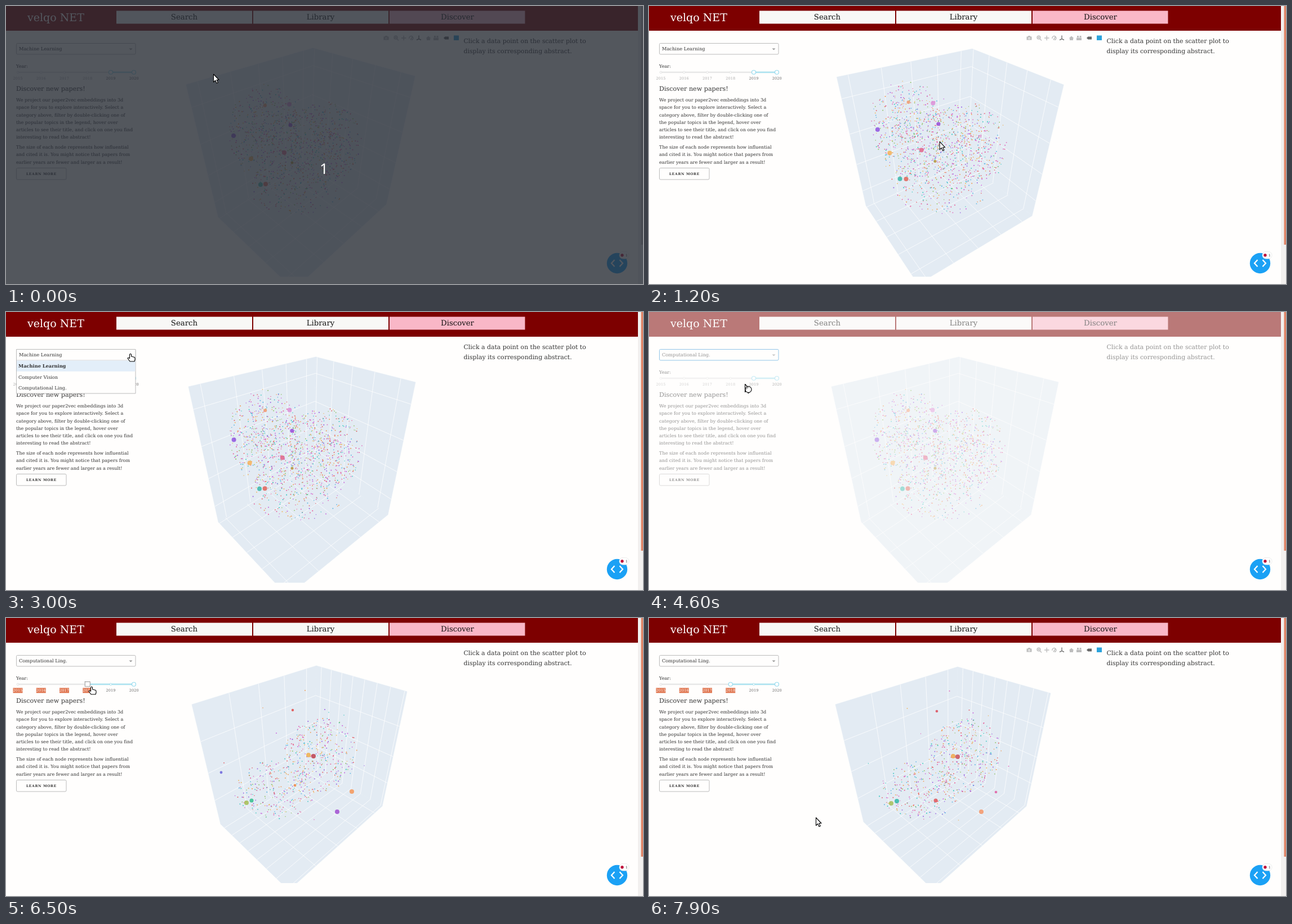
Animation of 1131x495 px, one loop 8000 ms. Source, as an HTML page with a canvas:

```html
<!DOCTYPE html>
<html lang="en">
<head>
<meta charset="utf-8">
<title>Paper explorer</title>
<style>
html, body { margin: 0; width: 100%; height: 100%; overflow: hidden; background: #fffefd; }
#app, #app > *, #top { position: absolute; left: 0; top: 0; width: 1131px; height: 495px; }
svg { display: block; }
text { font-family: "DejaVu Serif", serif; text-rendering: geometricPrecision; white-space: pre; fill: #333; }
.nav { font-size: 13.3px; text-anchor: middle; fill: #111; }
.lead { font-size: 10.9px; }
.body { font-size: 8.12px; }
.field { font-size: 8.25px; }
.year { font-size: 6.6px; text-anchor: middle; fill: #aaa; }
.year.on { fill: #666; }
.year.picked { fill: #fff; }
.tip text { font: 6.95px "Liberation Sans", Arial, sans-serif; fill: #444; }
.box { fill: #fffefd; stroke: #bbb; }
.spike path { fill: none; stroke: #444; stroke-width: .9; }
.arrow, .hand { fill: #fff; stroke: #000; stroke-width: 1.1; stroke-linejoin: round; }
</style>
</head>
<body>
<div id="app">
  <canvas id="plot" width="1131" height="495"></canvas>
  <svg viewBox="0 0 1131 495">
    <rect width="1122" height="44" fill="#7d0000"/>
    <text x="38" y="26.5" font-size="19" style="fill:#fff">velqo NET</text>
    <rect x="196" y="8.5" width="241" height="23" fill="#f8f8f6"/>
    <rect x="439" y="8.5" width="240" height="23" fill="#f8f8f6"/>
    <rect x="681" y="8.5" width="240.500" height="23" fill="#f9b7c7"/>
    <text class="nav" x="316.500" y="24.300">Search</text>
    <text class="nav" x="558.500" y="24.300">Library</text>
    <text class="nav" x="801.500" y="24.300">Discover</text>

    <text class="lead" x="812.500" y="66">Click a data point on the scatter plot to</text>
    <text class="lead" x="812.500" y="84">display its corresponding abstract.</text>

    <rect id="select" class="box" x="18.500" y="66.500" width="211.500" height="19.500" rx="2"/>
    <text id="value" class="field" x="23" y="78.500"></text>
    <path d="M218.500 75.500h6l-3 3z" fill="#999"/>

    <text class="body" x="18" y="110">Year:</text>
    <g id="slider"></g>

    <text font-size="11.150" x="18" y="150.500">Discover new papers!</text>
    <g id="copy"></g>
    <rect class="box" x="18.500" y="288.500" width="88.500" height="20.500" rx="2"/>
    <text x="36" y="301" font-size="6" font-weight="bold" letter-spacing=".65">LEARN MORE</text>

    <g id="menu">
      <path class="box" d="M18.500 66.500h211.500v78.500h-211.500z"/>
      <text class="field" x="23" y="78.500">Machine Learning</text>
      <rect id="hover" x="19" width="210.500" height="19.500" fill="#e3eef9"/>
      <path d="M19 85.800h211" stroke="#ddd"/>
      <text class="field" x="22" y="99.300" font-weight="bold">Machine Learning</text>
      <text class="field" x="22" y="119">Computer Vision</text>
      <text class="field" x="22" y="138.300">Computational Ling.</text>
    </g>

    <g id="modebar" fill="none" stroke="#bdbdbd" stroke-width="1.400">
      <path d="M670.500 54.500h2l1-1.500h3l1 1.500h2v6h-9z" fill="#bdbdbd" stroke="none"/>
      <circle cx="675" cy="57.500" r="1.400" stroke="#fff" stroke-width="1"/>
      <circle cx="692" cy="56" r="2.900"/><path d="M694 58.500l3 3M690.500 56h3M692 54.500v3"/>
      <path d="M702 57h8.500M706.300 52.800v8.500"/>
      <path d="M716 58a3.500 3.500 0 1 1 4 2.500M718 60.500l4-6"/>
      <path d="M733 52.500v6M729 60.500l4-2 4 2" stroke="#777"/>
      <path d="M745.500 57.500l4.500-4 4.500 4h-1.500v3.500h-6v-3.500z" fill="#bdbdbd" stroke="none"/>
      <path d="M759 56.500h9v4.500h-9zM760 53h3v3h-3zM764.500 53h3v3h-3z" fill="#bdbdbd" stroke="none"/>
      <path d="M777 57l2.500-2.500h6.500v5h-6.500z" fill="#666" stroke="none"/>
      <rect x="795" y="52.500" width="9" height="8.500" fill="#2ba3dc" stroke="none"/>
    </g>

    <g id="tip" class="tip">
      <g class="spike">
        <path d="M481 93L492 300L627 396M596 89L581 298L416 411M353 272L543 184L697 252"/>
        <path d="M487 208L533 240L588 205M533 240V332"/>
      </g>
      <rect x="643" y="212" width="50.500" height="43" fill="#fffefd" fill-opacity=".85"/>
      <rect x="371" y="212.500" width="271" height="42.500" fill="#f59d5d" stroke="#555"/>
      <text x="373" y="222">x: −4.703126</text>
      <text x="373" y="231.600">y: −2.84621</text>
      <text x="373" y="241">z: 0.1473798</text>
      <text x="373" y="250.300">[1911.99103] Wave Modeling of Underground Heat by Gradient-trained Filter Units</text>
      <text x="645" y="222" style="fill:#f0a35f">Deep learning</text>
    </g>
  </svg>
</div>

<svg id="top" viewBox="0 0 1131 495">
  <rect x="1122" width="9" height="495" fill="#f2f0ef"/>
  <rect id="thumb" x="1127.500" width="3.500" height="425"/>
  <circle cx="1085" cy="458" r="18.200" fill="#1ba1f5"/>
  <path d="M1080.500 452l-5.500 6 5.500 6M1089.500 452l5.500 6-5.500 6" fill="none" stroke="#fff" stroke-width="2.200"/>
  <rect x="1089" y="437.500" width="17" height="12.500" rx="6" fill="#fff" stroke="#e4e4e4" stroke-width=".7"/>
  <circle cx="1094" cy="443.700" r="2.700" fill="#c0143c"/>
  <text x="1100" y="446" font-size="6">1</text>
  <g id="countdown">
    <rect width="1131" height="495" fill="#292d36" fill-opacity=".8"/>
    <text x="564.500" y="299" text-anchor="middle" style="font:26px 'Noto Sans',sans-serif;fill:#fff">1</text>
  </g>
  <g id="cursor">
    <path id="arrow" class="arrow" d="M.5 .5V14.500L3.700 11.500L6 16.500L8.300 15.500L6 10.500H10z"/>
    <g id="busy"><circle cx="6.500" cy="10" r="5.500" fill="#fff" stroke="#222" stroke-width="1.300"/><path id="spin" d="M6.500 6.500a3.500 3.500 0 0 1 3.500 3.500" fill="none" stroke="#888" stroke-width="1.300"/></g>
    <path id="hand" class="hand" d="M-1.500 8.500V1.500Q0 -.5 1.500 1.500V5L7 6.500Q8 7 8 9V11L7 14H-1L-5 8.500Q-4.500 6.500 -1.500 8.500z"/>
  </g>
</svg>

<script>
const $ = id => document.getElementById(id);
const show = (id, on) => { $(id).style.display = on ? '' : 'none'; };
const mix = (a, b, k) => a + (b - a) * k;

// Piecewise linear value over rows of [time, ...values].
function track(rows, t) {
  let i = 0;
  while (i < rows.length - 1 && rows[i + 1][0] <= t) i++;
  const a = rows[i], b = rows[i + 1];
  if (!b) return a.slice(1);
  const k = (t - a[0]) / (b[0] - a[0]);
  return a.slice(1).map((v, n) => mix(v, b[n + 1], k));
}

function random(seed) {
  return () => {
    seed = (seed + 0x6D2B79F5) | 0;
    let n = Math.imul(seed ^ seed >>> 15, 1 | seed);
    n = n + Math.imul(n ^ n >>> 7, 61 | n) ^ n;
    return ((n ^ n >>> 14) >>> 0) / 4294967296;
  };
}

const copy = [
  'We project our paper2vec embeddings into 3d', 'space for you to explore interactively. Select a',
  'category above, filter by double-clicking one of', 'the popular topics in the legend, hover over',
  'articles to see their title, and click on one you find', 'interesting to read the abstract!',
  'The size of each node represents how influential', 'and cited it is. You might notice that papers from',
  'earlier years are fewer and larger as a result!'];
$('copy').innerHTML = copy.map((line, i) =>
  `<text class="body" x="18" y="${170 + i * 13.25 + (i > 5 ? 4.7 : 0)}">${line}</text>`).join('');

const yearX = i => 21 + i * 41.25;
function drawSlider(low, picked, focused) {
  let s = `<path d="M21 118H227" stroke="#e7e7e7" stroke-width="2.500"/>
    <path d="M${low} 118H227" stroke="#abe2f0" stroke-width="2.500"/>`;
  for (let i = 0; i < 6; i++) {
    const x = yearX(i), on = x >= low - 2, pick = picked && i < 4;
    s += `<circle cx="${x}" cy="118" r="1.800" fill="#fff" stroke="${on ? '#abe2f0' : '#e2e2e2'}"/>`;
    if (pick) s += `<rect x="${x - 8.500}" y="124.500" width="17" height="9" fill="#e0754f"/>`;
    s += `<text class="year ${pick ? 'picked' : on ? 'on' : ''}" x="${x}" y="131.300">${2015 + i}</text>`;
  }
  for (const x of [low, 227])
    s += `<circle cx="${x}" cy="118" r="3.500" fill="#fff" stroke="#96dbee" stroke-width="1.200"/>`;
  if (focused) s += `<rect x="${low - 4.500}" y="113.500" width="9" height="8.500" fill="#fff" stroke="#333" stroke-dasharray="1 1"/>`;
  $('slider').innerHTML = s;
}

// Cube corners: back top, left top, right top, left bottom, right bottom, front bottom, back bottom.
const poses = [
  [545,75, 320,140, 726,125, 377,376, 675,353, 511,505, 540,270],
  [590,77, 341,119, 742,149, 390,344, 683,385, 459,490, 578,277],
  [550,80, 324,133, 727,125, 377,374, 678,361, 500,506, 546,268],
  [551,85, 330,154, 712,131, 381,367, 668,335, 502,485, 546,265],
  [548,87, 331,154, 713,134, 381,363, 670,335, 504,484, 545,265]];
const turn = [[0, 0], [800, 0], [1300, .8], [1400, .8], [1700, 1], [2100, 2]];

const steps = (from, gap, n) => Array.from({ length: n }, (_, i) => from + gap * i);
const ticks = [
  { u: steps(.065, .208, 5), v: steps(.02, .218, 5), w: steps(.13, .24, 4) },
  { u: steps(.235, .22, 4), v: steps(.07, .13, 8), w: steps(.25, .25, 3) }];

// Maps the unit square onto a quad in perspective.
function quad([x0, y0], [x1, y1], [x2, y2], [x3, y3]) {
  const ax = x1 - x2, ay = y1 - y2, bx = x3 - x2, by = y3 - y2;
  const sx = x0 - x1 + x2 - x3, sy = y0 - y1 + y2 - y3, den = ax * by - bx * ay;
  const g = (sx * by - bx * sy) / den, h = (ax * sy - sx * ay) / den;
  return (s, t) => {
    const w = g * s + h * t + 1;
    return [((x1 - x0 + g * x1) * s + (x3 - x0 + h * x3) * t + x0) / w,
            ((y1 - y0 + g * y1) * s + (y3 - y0 + h * y3) * t + y0) / w];
  };
}

const ctx = $('plot').getContext('2d');
function drawCube(flat, grid) {
  const [T, L, R, l, r, F, B] = steps(0, 2, 7).map(i => [flat[i], flat[i + 1]]);
  const faces = [[[L, T, B, l], grid.u, grid.w], [[T, R, r, B], grid.v, grid.w], [[l, B, r, F], grid.u, grid.v]];
  ctx.fillStyle = ctx.strokeStyle = '#e3ebf3';
  ctx.lineWidth = .6;
  for (const [corners] of faces) {
    ctx.beginPath();
    corners.forEach(p => ctx.lineTo(...p));
    ctx.closePath(); ctx.fill(); ctx.stroke();
  }
  ctx.strokeStyle = '#fff';
  ctx.lineWidth = .75;
  ctx.beginPath();
  for (const [corners, across, down] of faces) {
    const at = quad(...corners);
    for (const s of across) { ctx.moveTo(...at(s, 0)); ctx.lineTo(...at(s, 1)); }
    for (const t of down) { ctx.moveTo(...at(0, t)); ctx.lineTo(...at(1, t)); }
  }
  ctx.stroke();
}

const palette = ['#f2913f', '#e8498a', '#27c4bc', '#c54fd8', '#e4555c', '#8cbf5a', '#8f4fe0', '#4aaee0', '#f0b252', '#e05cb8'];
const color = rnd => palette[Math.floor(rnd() * palette.length)];
const dotSize = rnd => .7 + rnd() * .35;

// Random points in weighted ellipses given as [share, cx, cy, rx, ry].
function scatter(rnd, count, ellipses) {
  return Array.from({ length: count }, () => {
    let pick = rnd();
    const [, cx, cy, rx, ry] = ellipses.find(e => (pick -= e[0]) < 0) || ellipses[0];
    const a = rnd() * 2 * Math.PI, d = rnd() ** .6;
    return [cx + rx * d * Math.cos(a), cy + ry * d * Math.sin(a)];
  });
}

function firstCloud() {
  const rnd = random(11);
  const spots = scatter(rnd, 1250, [[.36, 458, 222, 62, 84], [.36, 565, 242, 66, 72], [.16, 515, 325, 85, 46], [.12, 505, 250, 100, 95]]);
  const dots = spots.map(([x, y]) =>
    ({ x, y, dx: (rnd() - .5) * 26, dy: (x - 535) * .12, r: dotSize(rnd), c: color(rnd) }));
  const big = [[503,175,2,-3,4,'#dc92d8'], [505,212,14,-3,3.5,'#9a4fd8'], [404,231,3,-17,4,'#9258e0'],
    [435,272,-12,-16,4,'#f5b45c'], [494,261,-16,-7,4,'#e0688c'], [452,318,-10,-16,4,'#3cb8ac'],
    [461,317,-7,-14,4,'#e0665c'], [460,177,1,-9,3,'#f09a70'], [508,279,0,-4,2.5,'#b8963c']];
  return dots.concat(big.map(([x, y, dx, dy, r, c]) => ({ x, y, dx, dy, r, c })));
}

function secondCloud(seed, ox, oy, big) {
  const tint = random(seed);
  const dots = scatter(random(5), 580, [[.52, 560, 243, 66, 66], [.48, 477, 306, 72, 53]]);
  dots.push([531,129], [456,160], [566,163], [573,168], [600,173], [387,258], [636,263], [480,205], [547,359]);
  return dots.map(([x, y]) => ({ x: x + ox, y: y + oy, r: dotSize(tint), c: color(tint) }))
    .concat(big.map(([x, y, r, c]) => ({ x, y, r, c })));
}

const clouds = [firstCloud(),
  secondCloud(3, 0, 0, [[509,164,2.2,'#e0504f'], [537,244,4,'#efb150'], [546,246,4,'#bf4352'], [427,329,4,'#a6bf58'],
    [436,325,3.5,'#38bf90'], [614,309,4,'#f5995c'], [588,345,4,'#a352d2'], [382,275,2.4,'#6f68dc'], [513,298,2.4,'#f08c48']]),
  secondCloud(8, 2.5, 1, [[511,166,2.3,'#dc525e'], [540,246,4,'#f0a850'], [548,247,4,'#c8545e'], [430,330,4,'#a8c05c'],
    [440,326,4,'#36b8a8'], [616,310,2.3,'#e060a4'], [590,345,4,'#f5996c'], [509,325,3.5,'#e05a60']])];

function drawPlot(t) {
  const late = t >= 5500, stage = t < 5500 ? 0 : t < 7300 ? 1 : 2;
  const p = track(turn, t)[0], i = Math.min(1, Math.floor(p));
  const pose = late ? poses[stage + 2] : poses[i].map((v, n) => mix(v, poses[i + 1][n], p - i));
  const sway = late ? 0 : p <= 1 ? p : 1 - .8 * (p - 1);
  ctx.clearRect(0, 0, 1131, 495);
  ctx.save();
  ctx.beginPath();
  ctx.rect(250, 50, 560, (late ? 472 : 482) - 50);
  ctx.clip();
  drawCube(pose, ticks[+late]);
  ctx.globalAlpha = .88;
  for (const d of clouds[stage]) {
    ctx.fillStyle = d.c;
    ctx.beginPath();
    ctx.arc(d.x + (d.dx || 0) * sway, d.y + (d.dy || 0) * sway, d.r, 0, 7);
    ctx.fill();
  }
  ctx.restore();
}

const pointer = [[0, 368, 121], [200, 368, 121], [700, 534, 238], [800, 534, 238], [1300, 511, 242], [1400, 511, 242],
  [1700, 504, 243], [2000, 530, 240], [2300, 274, 105], [2700, 221, 74], [3000, 221, 74], [3300, 170, 128],
  [5400, 170, 128], [5500, 189, 120], [5700, 189, 120], [6000, 152, 122], [6500, 152, 122], [7300, 364, 190],
  [7500, 400, 240], [7600, 400, 240], [7700, 296, 355]];

function fade(t) {
  const start = t >= 3900 && t < 5500 ? 3900 : t >= 6500 && t < 7300 ? 6500 : t;
  const k = Math.min(1, (t - start) / 800);
  return 1 - .5 * k * k * (3 - 2 * k);
}

function render(t) {
  drawPlot(t);
  const switched = t >= 3900, focused = switched && t < 5500;
  $('app').style.opacity = fade(t);
  $('value').textContent = switched ? 'Computational Ling.' : 'Machine Learning';
  $('select').style.stroke = focused ? '#2f93d6' : '';
  drawSlider(track([[5700, 186], [6000, 144.75]], Math.max(t, 5700))[0], t >= 5800, t >= 5800 && t < 7900);
  show('countdown', t < 300);
  show('tip', t >= 700 && t < 900);
  show('modebar', t < 2400 || t >= 7400);
  show('menu', t >= 3000 && t < 3900);
  $('hover').setAttribute('y', t < 3200 ? 86.3 : t < 3300 ? 106 : 125);
  $('thumb').setAttribute('fill', t < 900 ? '#c3c0be' : '#e08568');

  const [x, y] = track(pointer, t);
  const hand = t >= 2600 && t < 3900 || t >= 5500 && t < 6700;
  $('cursor').setAttribute('transform', `translate(${x} ${y})`);
  show('hand', hand);
  show('arrow', !hand);
  show('busy', focused);
  $('spin').setAttribute('transform', `rotate(${t * .45} 6.5 10)`);
}

let last = -1;
const origin = performance.now();
function tick() {
  const t = Math.floor((performance.now() - origin) % 8000 / 100) * 100;
  if (t !== last) render(last = t);
  requestAnimationFrame(tick);
}
tick();
</script>
</body>
</html>
```
